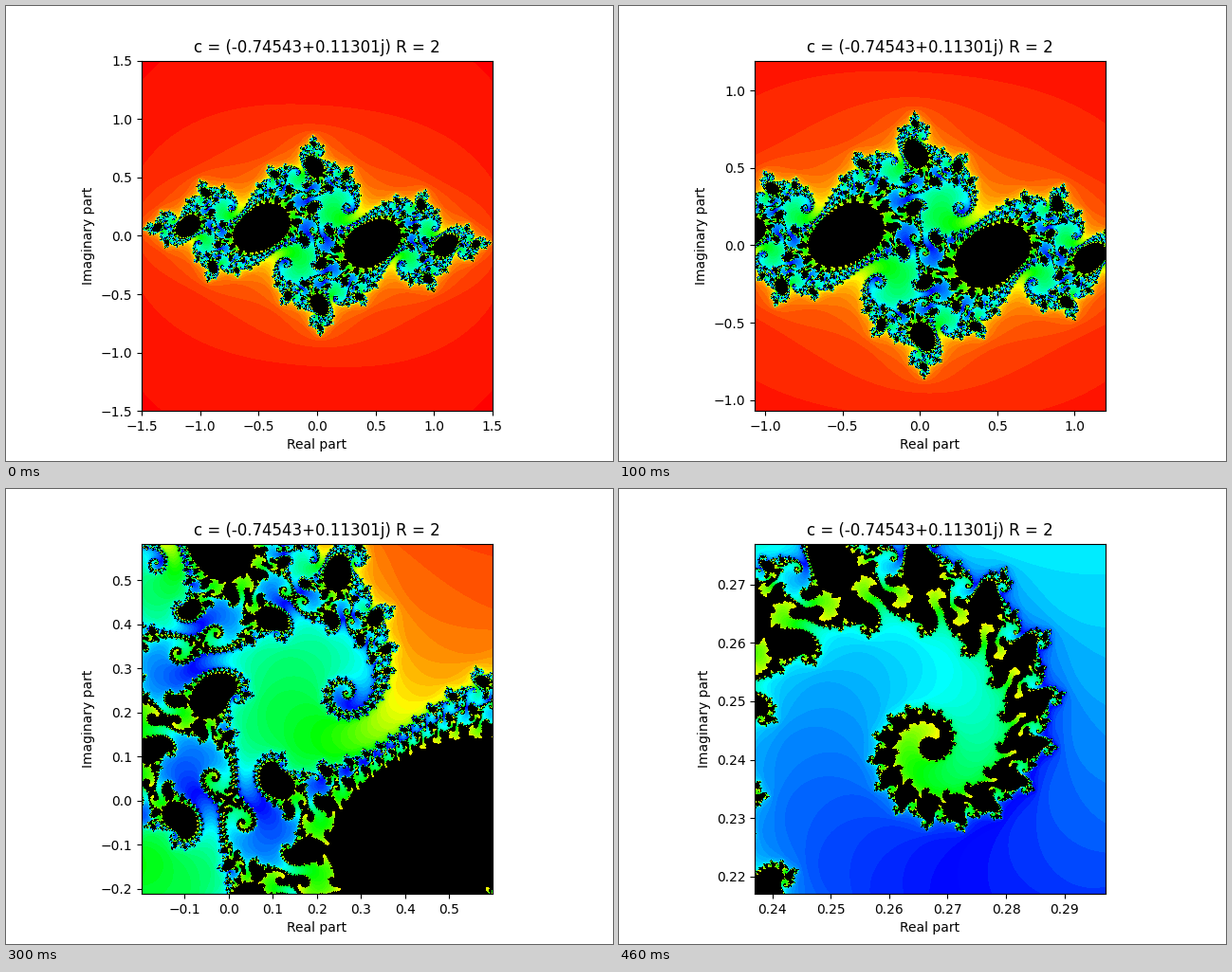
A matplotlib script that plays this animation: 640x480 px, repeating every 500 ms.

```python
import numpy as np
import matplotlib.pyplot as plt
from matplotlib.animation import FuncAnimation
from matplotlib.colors import LinearSegmentedColormap

C = complex(-0.74543, 0.11301)
R = 2
MAX_ITER = 100
SIZE = 740
FRAMES = 5

# Left, right, bottom, top of the first and the last view.
START = np.array([-1.5, 1.5, -1.5, 1.5])
END = np.array([0.237, 0.297, 0.217, 0.277])

# Up the spectrum to blue in the first half, back down to yellow in the second.
RISE = ["red", "yellow", "lime", "cyan", "blue"]
FALL = ["cyan", "lime", "yellow"]
STOPS = np.append(np.linspace(0, 0.5, 5), np.linspace(0.5, 1, 4)[1:])
CMAP = LinearSegmentedColormap.from_list(
    "julia", list(zip(STOPS, RISE + FALL)), N=2048)
CMAP.set_over("black")


def view(i):
    return START + (END - START) * i / (FRAMES - 1)


def pixel_centres(low, high):
    return low + (high - low) * (np.arange(SIZE) + 0.5) / SIZE


def escape_times(left, right, bottom, top):
    """Number of steps each point needs to leave the disc of radius R."""
    x = pixel_centres(left, right)
    y = pixel_centres(bottom, top)
    z = (x[None, :] + 1j * y[:, None]).ravel()
    steps = np.full(z.size, MAX_ITER)
    alive = np.arange(z.size)
    for n in range(MAX_ITER):
        inside = z.real ** 2 + z.imag ** 2 <= R * R
        steps[alive[~inside]] = n
        alive, z = alive[inside], z[inside]
        z = z * z + C
    return steps.reshape(SIZE, SIZE)


fig, ax = plt.subplots(figsize=(6.4, 4.8), dpi=100)
images = [escape_times(*view(i)) for i in range(FRAMES)]


def draw(i):
    ax.clear()
    # Points that never leave lie above vmax and come out black.
    ax.imshow(images[i], cmap=CMAP, vmin=0, vmax=MAX_ITER - 1, origin="lower",
              extent=view(i), interpolation="nearest")
    ax.set_title(f"c = {C} R = {R}")
    ax.set_xlabel("Real part")
    ax.set_ylabel("Imaginary part")
    return ax.get_children()


anim = FuncAnimation(fig, draw, frames=FRAMES, interval=100, repeat=True,
                     repeat_delay=0, init_func=lambda: draw(0))
plt.show()
```
